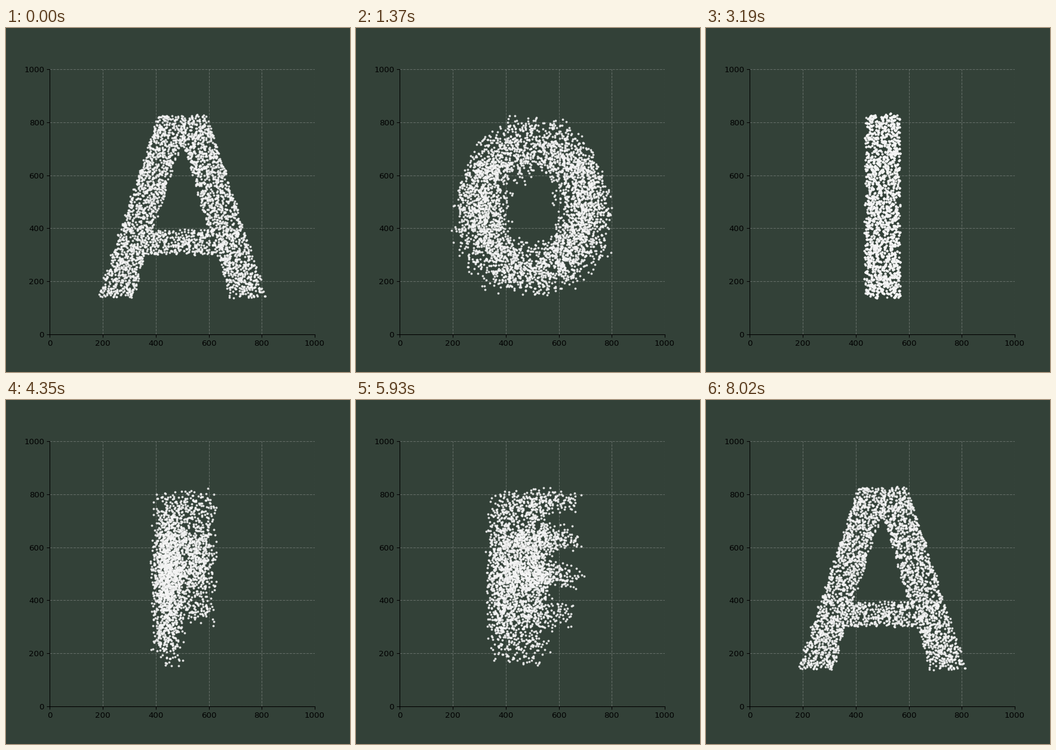
A matplotlib script for the animation above (8670 ms loop, 576 by 576 pixels).

```python
import numpy as np
import matplotlib.pyplot as plt
from matplotlib.animation import FuncAnimation
from matplotlib.path import Path

BG = "#334138"
INTERVAL = 30       # ms per frame
FRAMES = 289
HOLD = 650          # ms before the first morph
PERIOD = 1610       # ms from one morph to the next
STEPS = 32          # frames in one morph
JITTER = 6          # softens the letter edges

rng = np.random.default_rng(7)


def inside(points, polygon):
    return Path(polygon).contains_points(points)


def box(points, x0, x1, y0, y1):
    x, y = points.T
    return (x > x0) & (x < x1) & (y > y0) & (y < y1)


def oval(points, rx, ry):
    x, y = np.abs(points - (500, 484)).T
    return (x / rx) ** 2.15 + (y / ry) ** 2.15 < 1


def letter_a(p):
    outer = [(181, 140), (312, 140), (360, 302), (635, 302), (681, 140),
             (817, 140), (590, 828), (410, 828)]
    hole = [(387, 394), (599, 394), (510, 685), (497, 714), (484, 685)]
    return inside(p, outer) & ~inside(p, hole)


def letter_o(p):
    return oval(p, 325, 355) & ~oval(p, 178, 248)


def letter_i(p):
    return box(p, 436, 565, 140, 828)


def letter_f(p):
    return (box(p, 330, 462, 140, 828) | box(p, 330, 706, 715, 828)
            | box(p, 330, 684, 436, 550))


def letter_e(p):
    return (box(p, 315, 448, 140, 828) | box(p, 315, 706, 715, 828)
            | box(p, 315, 668, 440, 552) | box(p, 315, 708, 140, 252))


def scatter_in(shape):
    """Even random cloud whose size follows the area of the shape."""
    points = rng.uniform(0, 1000, (16300, 2))
    points = points[shape(points)]
    angle = rng.uniform(0, 2 * np.pi, len(points))
    radius = JITTER * np.sqrt(rng.uniform(0, 1, len(points)))
    return points + np.column_stack((np.cos(angle), np.sin(angle))) * radius[:, None]


def padded(points, count):
    """Shuffle the cloud and repeat some points to reach the count."""
    extra = rng.integers(0, len(points), count - len(points))
    return rng.permutation(np.concatenate((points, points[extra])))


def pair(start, end):
    count = max(len(start), len(end))
    return padded(start, count), padded(end, count)


clouds = [scatter_in(s) for s in (letter_a, letter_o, letter_i, letter_f, letter_e)]
morphs = [pair(a, b) for a, b in zip(clouds, clouds[1:] + clouds[:1])]

fig, ax = plt.subplots(figsize=(6, 6), dpi=96, facecolor=BG)
ax.set_facecolor(BG)
ax.set(xlim=(0, 1000), ylim=(0, 1000), aspect="equal")
ax.spines[["top", "right"]].set_visible(False)
ax.grid(linestyle="--", color="#b0b0b0", alpha=0.4)
dots = ax.scatter([], [], s=3.5, color="whitesmoke", alpha=0.8)


def positions(time):
    if time < HOLD:
        return morphs[-1][1]
    index, local = divmod(time - HOLD, PERIOD)
    start, end = morphs[index]
    part = min(1, (local // INTERVAL + 1) / STEPS)
    return start + (end - start) * part


def update(frame):
    dots.set_offsets(positions(frame * INTERVAL + 20))
    return (dots,)


anim = FuncAnimation(fig, update, frames=FRAMES, interval=INTERVAL,
                     repeat=True, repeat_delay=0)
plt.show()
```
